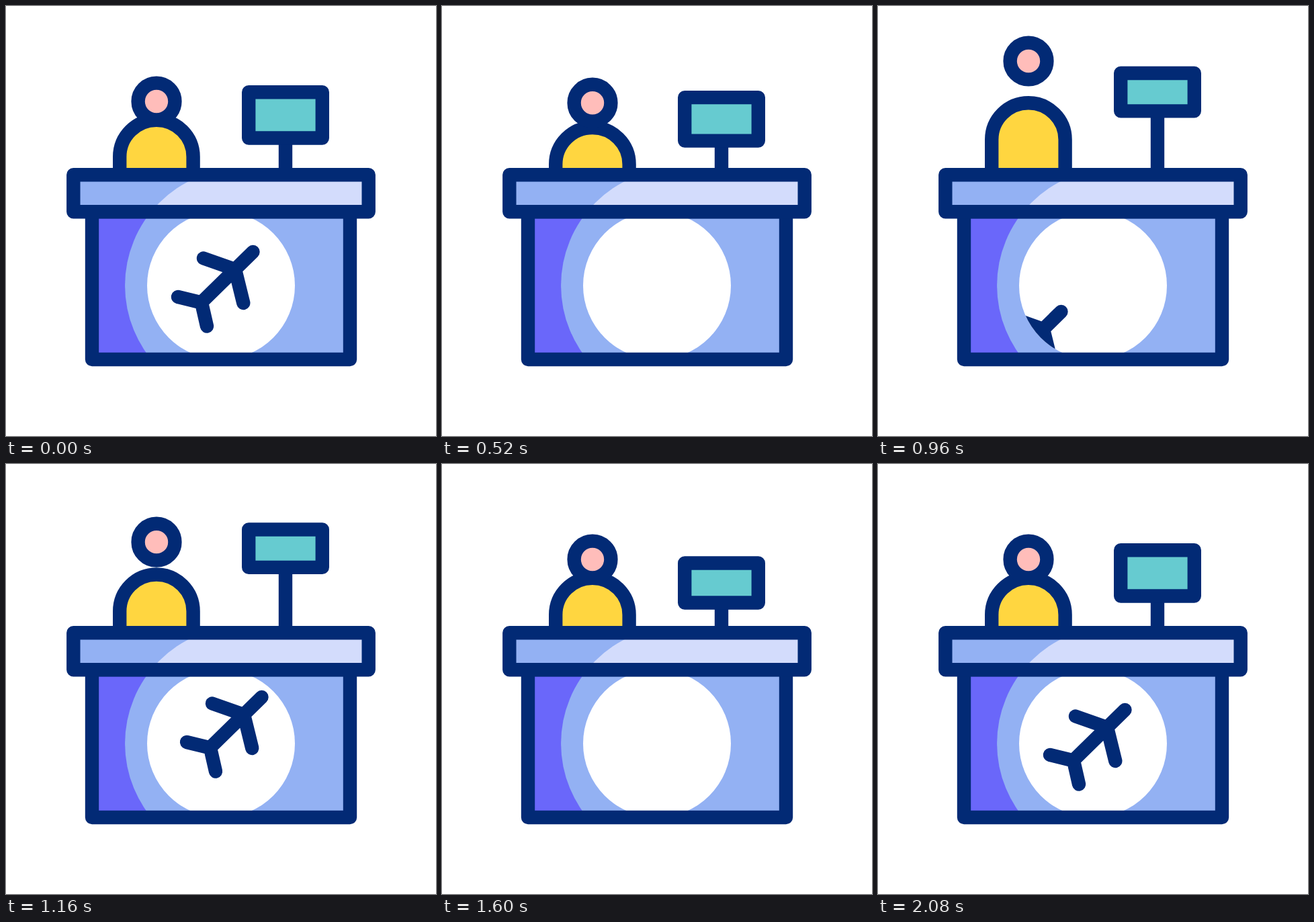
These frames come from a looping animation (640x640 px, 2240 ms). An HTML page:

```html
<!DOCTYPE html>
<html>
<head>
<meta charset="utf-8">
<style>
html, body { margin: 0; height: 100%; overflow: hidden; background: #fff; }
svg { display: block; width: 100vw; height: 100vh; }
.line { stroke: #022a75; stroke-width: 20.4; stroke-linecap: round; stroke-linejoin: round; fill: none; }
</style>
</head>
<body>
<svg viewBox="0 0 640 640">
  <defs>
    <path id="sweep" d="M351 242A174 174 0 0 0 351 590H560V242Z"/>
    <clipPath id="front"><rect x="128" y="306" width="384" height="220"/></clipPath>
    <clipPath id="top"><rect x="100.3" y="251.3" width="439.4" height="55"/></clipPath>
    <clipPath id="disc"><circle cx="320" cy="416" r="110"/></clipPath>
  </defs>

  <path id="body" class="line" style="fill:#ffd640" d="M169.2 290V224.5a54.7 54.7 0 0 1 109.4 0V290"/>
  <circle id="head" class="line" style="fill:#ffbdba" cx="224" cy="142" r="27.4"/>
  <path id="pole" class="line"/>
  <rect id="screen" class="line" style="fill:#66cbd0" x="361.2" width="109.6"/>

  <g clip-path="url(#front)">
    <rect x="128" y="306" width="384" height="220" fill="#6a67fa"/>
    <use href="#sweep" fill="#93b1f3"/>
    <circle cx="320" cy="416" r="110" fill="#fff"/>
  </g>
  <g clip-path="url(#disc)">
    <path id="plane" class="line" d="M367.5 366L291 441M294 375.5L341 392L353.3 442M256 433L291 441.5L299 476.5"/>
  </g>
  <rect class="line" x="128" y="306" width="384" height="220"/>
  <g clip-path="url(#top)">
    <rect x="100" y="251" width="440" height="56" fill="#93b1f3"/>
    <use href="#sweep" fill="#d3dcfc"/>
  </g>
  <rect class="line" x="100.3" y="251.3" width="439.4" height="55"/>
</svg>
<script>
const LOOP = 2240, STEP = 40;
const el = id => document.getElementById(id);
const smooth = x => x * x * (3 - 2 * x);
const move = (id, x, y) => el(id).setAttribute('transform', `translate(${x} ${y})`);

// Eased value at time t through [time, value] keys
function track(t, keys) {
  if (t <= keys[0][0]) return keys[0][1];
  for (let i = 1; i < keys.length; i++) {
    const [t0, a] = keys[i - 1], [t1, b] = keys[i];
    if (t < t1) return a + (b - a) * smooth((t - t0) / (t1 - t0));
  }
  return keys[keys.length - 1][1];
}

const hop = (t, peak) =>
  track(t, [[200, 0], [380, 24], [800, peak], [1055, peak], [1295, 24], [1470, 0]]);

const bounce = (t, low, high) =>
  track(t, [[400, 0], [720, low], [1050, high], [1510, low], [1800, 0]]);

// Take off, one fly-through, then land
function fly(t) {
  if (t < 200) return [0, 0];
  if (t < 800) {
    const d = 150 * ((t - 200) / 350) ** 2;
    return [d, -d];
  }
  if (t < 1480) {
    const d = 16 + (t - 1160) * 0.54;
    return [d - 3, -d - 3];
  }
  const d = -46 * (Math.max(0, 2080 - t) / 320) ** 3;
  return [d, -d];
}

function draw(now) {
  const t = Math.floor(now % LOOP / STEP) * STEP;
  move('head', 0, hop(t, -60));
  move('body', 0, hop(t, -25.5));
  move('plane', ...fly(t));

  const top = 128.2 + bounce(t, 25, -40);
  const bottom = 196.5 + bounce(t, 13, -52);
  el('screen').setAttribute('y', top);
  el('screen').setAttribute('height', bottom - top);
  el('pole').setAttribute('d', `M416 ${bottom}V251`);
}

const start = performance.now();
function tick() {
  draw(performance.now() - start);
  requestAnimationFrame(tick);
}
tick();
</script>
</body>
</html>
```
